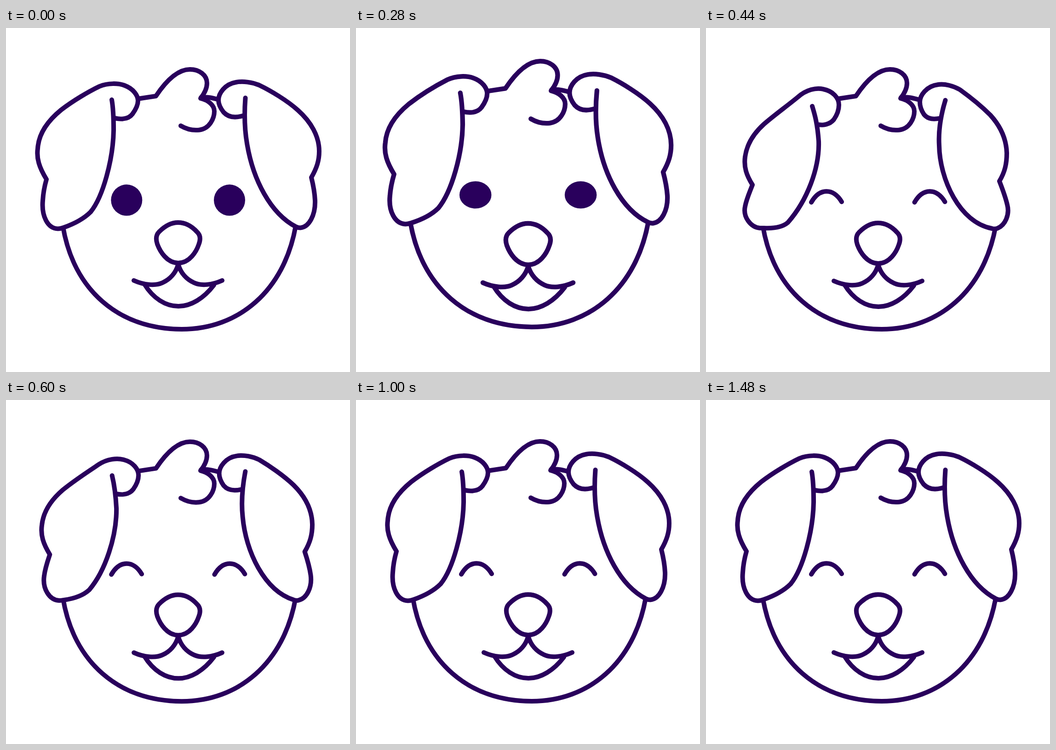
Recreate the animation shown at these times as an HTML page. Size 748 by 748 pixels, loop 1.6 s.

```html
<!DOCTYPE html>
<html lang="en">
<head>
<meta charset="utf-8">
<title>Happy dog</title>
<style>
html, body { margin: 0; width: 100%; height: 100%; overflow: hidden; background: #fff; }
svg { display: block; width: 100%; height: 100%; }
.line { fill: none; stroke: #29005c; stroke-width: 10; stroke-linecap: round; stroke-linejoin: round; }
.ear { fill: #fff; }
.eye { fill: #29005c; }
</style>
</head>
<body>
<svg viewBox="0 0 748 748">
  <g id="head">
    <path class="line" d="M123.5 430C147 570 244 654.5 382 655C506 655 605 571.5 630 430"/>
    <path class="line" d="M280 155L326 148C350 112 375 90 400 90C420 90 437 102 437 120C437 133 431 143 423 153C440 157 453 168 453 181C453 196 443 219 420 221.7C405 223.5 391 219 380 212.6"/>
    <path class="line" d="M424 151C438 149 450 152 470 158"/>
    <path class="line ear" id="earL"/>
    <path class="line ear" id="earR"/>
    <g id="open">
      <ellipse class="eye" cx="262.3" cy="374.3" rx="34"/>
      <ellipse class="eye" cx="486" cy="374.3" rx="34"/>
    </g>
    <g id="shut">
      <path class="line"/>
      <path class="line" transform="translate(224.5 0)"/>
    </g>
  </g>
  <g id="muzzle">
    <path class="line" d="M374 423C359 423 345 431 333 443C325 451 326 461 329 470C335 486 350 511 374.5 511C399 511 414 486 419 471C423 461 424 451 415 443C404 431 390 423 374 423Z"/>
    <path class="line" d="M278 549C300 559 325 561 340 554C356 547 369 533 374.5 514C380 533 393 547 409 554C424 561 448 559 470 549"/>
    <path class="line" d="M301 557C320 588 347 605 375 605C402 605 430 588 452 559"/>
  </g>
</svg>
<script>
const LOOP = 1600, STEP = 40;
const $ = id => document.getElementById(id);

// Each ear: relaxed pose, then swung inward.
const ears = {
  earL: [
    "M230 156C233 173 234 200 234 222C233 285 211 367 184 400C168 416 145 427 125 434C122 435 118 436.5 113 436.5C90 436 77 408 80 375C81 357 84 343 88 329C72 303 66 283 69 262C71 228 93 200 120 178C146 158 180 138 203 127C222 119 245 120 258 125C277 132 287 147 287 158C287 166 283 176 275 187C266 199 250 199 236 196",
    "M231 170C236 187 242 205 245 246C247 305 220 375 178 423C165 434 146 436 126 435C123 435 120 435 117 435C97 433 80 411 85 388C88 372 95 357 101 341C88 320 82 303 85 280C89 251 105 228 126 209C149 189 177 169 200 150C218 134 240 129 255 133C276 137 289 152 289 167C289 178 285 189 278 199C269 210 255 212 244 210"
  ],
  earR: [
    "M520.5 152C518 185 519 222 524 251C537 330 575 403 630 432C634 434 637 434.5 640 434.5C659 433 673 407 672 375C671 355 668 341 664 325C676 304 681 288 681 268C681 235 663 204 635 179C612 158 575 136 550 124C535 118 515 115 500 118C476 122 462 142 462 157C462 165 466 174 473 183C484 195 500 196 518 190",
    "M520.5 157C512 185 505 222 507 255C508 328 551 423 622 436C626 437 631 437 635 435C650 428 661 407 655 384C651 367 645 351 638 333C650 313 654 295 654 272C653 240 640 213 618 189C598 169 570 147 552 134C538 126 520 121 505 123C479 126 465 147 465 161C465 170 468 179 474 188C483 199 496 199 511 196"
  ]
};

const number = /[\d.]+/g;
function morph([from, to], k) {
  const end = to.match(number);
  let i = 0;
  return from.replace(number, n => (+n + (end[i++] - n) * k).toFixed(2));
}

// Eased value through [time, value] keys.
function track(t, keys) {
  if (t <= keys[0][0]) return keys[0][1];
  for (let i = 1; i < keys.length; i++) {
    const [t0, a] = keys[i - 1], [t1, b] = keys[i];
    if (t <= t1) {
      const u = (t - t0) / (t1 - t0);
      return a + (b - a) * u * u * (3 - 2 * u);
    }
  }
  return keys[keys.length - 1][1];
}

function place(id, scale, dy) {
  $(id).setAttribute("transform", `translate(${374 * (1 - scale)} ${dy}) scale(${scale})`);
}

function draw(t) {
  const lift = track(t, [[0, 0], [280, 1], [440, 0], [700, -0.06], [1000, 0]]);
  const swing = track(t, [[240, 0], [440, 1], [780, 0]]);
  const lid = track(t, [[240, 1], [400, 0.05]]);
  const smile = track(t, [[320, 0], [440, 1]]);
  const scale = 1 + 0.023 * lift;

  place("head", scale, -20 * lift);
  place("muzzle", scale, -8 * lift + swing);
  for (const id in ears) $(id).setAttribute("d", morph(ears[id], swing));

  const closed = t >= 360;
  $("open").style.display = closed ? "none" : "";
  $("shut").style.display = closed ? "" : "none";
  for (const eye of $("open").children) eye.setAttribute("ry", 34 * lid);
  const bend = 378 - 30.5 * smile;
  for (const eye of $("shut").children) {
    eye.setAttribute("d", `M229 379C247 ${bend} 277 ${bend} 295 378`);
  }
}

const start = performance.now();
function tick() {
  const t = (performance.now() - start) % LOOP;
  draw(Math.floor(t / STEP) * STEP);
  requestAnimationFrame(tick);
}
tick();
</script>
</body>
</html>
```
